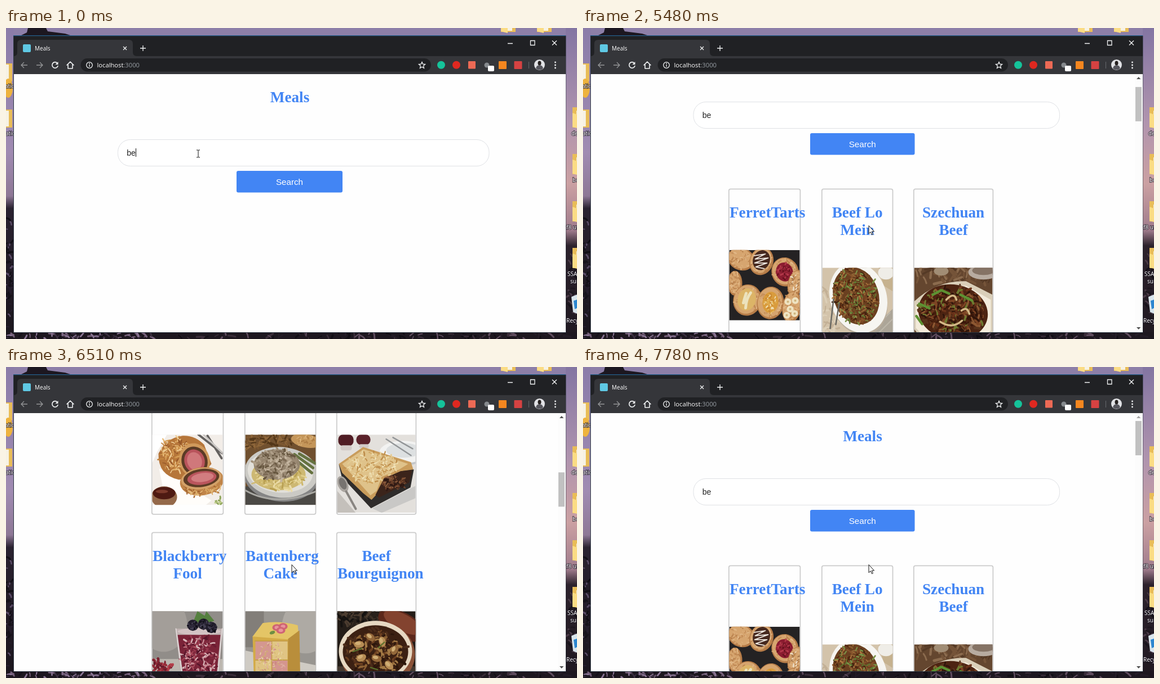
Recreate the animation shown at these times as an HTML page. Size 1013 by 553 pixels, loop 8000 ms.

```html
<!DOCTYPE html>
<html lang="en">
<head>
<meta charset="utf-8">
<title>Meals</title>
<style>
  html, body { margin: 0; width: 100%; height: 100%; overflow: hidden; background: #202124; }
  svg { display: block; }
  #stage { width: 1013px; height: 553px; }
  .ui { font: 10px "Open Sans", "Noto Sans", sans-serif; fill: #fff; }
  .label { paint-order: stroke; stroke: #1a1420; stroke-width: 2px; stroke-opacity: .7; }
  .head { font: bold 27.2px "Liberation Serif", serif; fill: #4285f4; }
  .field { font: 14px "Liberation Sans", sans-serif; fill: #222; }
  .btn { font: 15.2px "Liberation Sans", sans-serif; fill: #fff; }
  .line { fill: none; stroke: #f1f3f4; stroke-width: 1.3; }
</style>
</head>
<body>
<svg id="stage" viewBox="0 0 1013 553">
  <defs>
    <linearGradient id="dusk" x2="0" y2="1">
      <stop offset="0" stop-color="#8b7ca9"/><stop offset=".4" stop-color="#a08bb2"/>
      <stop offset=".54" stop-color="#8e7896"/><stop offset=".58" stop-color="#2a2230"/><stop offset="1" stop-color="#1a151c"/>
    </linearGradient>
    <linearGradient id="glow" x2="0" y2="1">
      <stop offset="0" stop-color="#8375a2"/><stop offset=".3" stop-color="#b094ae"/>
      <stop offset=".5" stop-color="#cba0a2"/><stop offset=".65" stop-color="#a07c8c"/>
      <stop offset=".7" stop-color="#2c222c"/><stop offset="1" stop-color="#1f1820"/>
    </linearGradient>
    <g id="folder">
      <path d="M0 2h11l3 4h12v32H0z" fill="#e9bd58"/><path d="M7 8h13v28H7z" fill="#f6f2e4"/>
      <path d="M0 12l12 4v24L0 37z" fill="#fbdc84"/>
    </g>
  </defs>
  <g id="desktop"></g>
  <g id="chrome"></g>
  <svg x="14" y="82" width="979" height="459" viewBox="14 82 979 459">
    <rect x="14" y="82" width="979" height="459" fill="#fefefe"/>
    <g id="before"></g>
    <g id="after">
      <g id="scroll"></g>
      <rect x="979.5" y="82" width="13.5" height="459" fill="#fcfcfc"/>
      <rect id="thumb" x="980" y="96" width="11" height="61" fill="#c1c1c1"/>
      <path id="up" d="M982 91l3.7-4 3.7 4z"/>
      <path d="M982 532l3.7 4 3.7-4z" fill="#505050"/>
    </g>
  </svg>
  <path id="arrow" d="M.5.5v14.2l3.2-3 2.3 5 2-1-2.2-4.7h4.3z" fill="#fff" stroke="#111"/>
</svg>
<script>
const $ = id => document.getElementById(id);
const rect = (x, y, w, h, fill, r = 0) => `<rect x="${x}" y="${y}" width="${w}" height="${h}" rx="${r}" fill="${fill}"/>`;
const oval = (x, y, rx, ry, fill, turn = 0) =>
  `<ellipse cx="${x}" cy="${y}" rx="${rx}" ry="${ry}" fill="${fill}" transform="rotate(${turn} ${x} ${y})"/>`;
const shape = (d, fill) => `<path d="${d}" fill="${fill}"/>`;
const line = (d, color, w) => `<path d="${d}" fill="none" stroke="${color}" stroke-width="${w}" stroke-linecap="round" stroke-linejoin="round"/>`;
const icon = d => `<path class="line" d="${d}"/>`;
const text = (cls, x, y, s, anchor = 'start') => `<text class="${cls}" x="${x}" y="${y}" text-anchor="${anchor}">${s}</text>`;

// Seeded short strokes inside a tilted ellipse, finer ones last
function bits(seed, n, cx, cy, rx, ry, colors, len = 6, w = 3, turn = 0) {
  const rnd = () => (seed = seed * 16807 % 2147483647) / 2147483647;
  rnd();
  let out = '';
  for (let i = 0; i < n; i++) {
    const a = rnd() * 6.283, r = Math.sqrt(rnd()), b = rnd() * 6.283, size = 1.2 - .7 * i / n;
    const x = cx + Math.cos(a) * r * rx, y = cy + Math.sin(a) * r * ry;
    const dx = Math.cos(b) * len * size, dy = Math.sin(b) * len * size;
    out += line(`M${x.toFixed(1)} ${y.toFixed(1)}q${(dx / 2 + 1).toFixed(1)} ${(dy / 2 - 1).toFixed(1)} ${dx.toFixed(1)} ${dy.toFixed(1)}`, colors[i % colors.length], (w * size).toFixed(1));
  }
  return `<g transform="rotate(${turn} ${cx} ${cy})">${out}</g>`;
}

// Baked dough: dark rim, light top, fine crumbs
const dough = (seed, x, y, rx, ry, turn) => oval(x, y, rx, ry, '#b67c48', turn) + oval(x - 1, y - 1, rx - 2.5, ry - 2.5, '#d6a56f', turn)
  + bits(seed, 45, x, y, rx - 3, ry - 3, ['#c48d58', '#e2b989', '#b9814d', '#dcae7a'], 4, 2, turn);

const photos = {
  pastries: () => rect(0, 0, 125, 125, '#242223')
    + dough(11, 21, 16, 24, 20, 20) + dough(12, 57, 20, 21, 25, 20) + oval(57, 18, 15, 18, '#46291f', 20)
    + line('M44 10l20-3-18 9 23-2-24 9 22 0-20 7 15 3', '#eee7df', 1.8)
    + dough(13, 99, 39, 24, 26, -20) + oval(98, 39, 15, 17, '#8b1c30', -20) + bits(5, 40, 97, 39, 12, 14, ['#b5394b', '#65101d', '#952537'], 4, 2.5)
    + dough(14, 10, 59, 13, 22, 0) + dough(15, 118, 59, 14, 24, 15) + bits(18, 14, 118, 58, 8, 14, ['#eee0c9', '#a3764c'], 4, 2)
    + dough(16, 32, 89, 25, 28, 15) + oval(31, 88, 16, 20, '#dcb467', 15) + line('M38 76q-8 10-9 27M30 77q-3 9-5 17', '#ece3bd', 5)
    + dough(17, 73, 94, 24, 29, 8) + oval(73, 93, 14, 19, '#d99c3d', 8) + bits(3, 50, 73, 94, 12, 17, ['#f1e0b5', '#c57f2c', '#e6b95c'], 3, 1.8)
    + dough(18, 111, 101, 17, 28, 10) + [[104, 92], [117, 90], [108, 105], [116, 113], [102, 116]].map(p => oval(...p, 6, 6, '#efe3c2') + oval(...p, 2, 2, '#cfb57d')).join(''),

  noodles: () => rect(0, 0, 125, 125, '#d3c3aa') + bits(24, 40, 12, 80, 16, 50, ['#dccfb8', '#c3b096'], 14, 3)
    + shape('M72 125l53-52v52z', '#aca598') + line('M80 120l40-40M92 124l32-32', '#bdb7aa', 2) + shape('M100 0h25v42l-16-10z', '#c6b28f')
    + oval(113, 9, 14, 12, '#efede7') + oval(65, 57, 49, 64, '#b7ab9a', -18) + oval(64, 53, 50, 64, '#f6f5f1', -18)
    + oval(60, 50, 40, 52, '#6a4020', -18)
    + bits(21, 330, 60, 50, 37, 49, ['#54270f', '#85522a', '#5f7a32', '#ac783f', '#3f200f', '#764322', '#8d6133', '#7a9248'], 7, 2.6, -18)
    + line('M14 108l6-52M24 101l6-38', '#696862', 2.5),

  szechuan: () => rect(0, 0, 139, 139, '#64462f') + bits(25, 50, 70, 12, 70, 14, ['#8b6b4e', '#755439', '#553a26'], 16, 4)
    + oval(123, 8, 27, 13, '#b7aba0') + oval(123, 5, 20, 8, '#857365') + oval(48, 6, 13, 8, '#a18d75')
    + shape('M0 60Q40 22 92 24l47 24v71l-32 20H23L0 109z', '#dacfb9') + shape('M3 66Q44 30 92 32l44 25v55l-31 24H30L3 107z', '#f3ebdb')
    + oval(69, 79, 62, 49, '#4d2412', 10)
    + bits(31, 300, 68, 78, 56, 43, ['#3a170a', '#693219', '#7d4524', '#4a210f', '#58331c', '#2f150b', '#8d5731', '#6e7a30'], 9, 4)
    + line('M9 64l18 8M33 48l15-8 14 6M82 48l20 10M4 86l10 14', '#5d9132', 4.500)
    + line('M57 57q14-15 18 0M46 96q22 14 39-2M84 76q10-8 14 6', '#d4b887', 3.500),

  wellington: () => rect(0, 0, 125, 125, '#f2ede8') + shape('M0 0h26L9 30 0 50z', '#fff')
    + line('M98 2l25 40M82 0l42 33', '#64615f', 4) + line('M91 0l34 33', '#c9c6c3', 3)
    + shape('M12 60l93 57-10 8H25z', '#fffdfa')
    + shape('M11 34Q24 6 54 2q22-1 38 16l13 34-22 26-36 2Q10 72 11 34z', '#b6763a')
    + bits(9, 130, 42, 36, 29, 29, ['#d79f58', '#e9bd7c', '#98592a', '#c4853f', '#f0cf98'], 8, 2.2)
    + oval(75, 46, 27, 31, '#d09a5c', -18) + oval(75, 47, 23, 26, '#5b3b26', -18) + oval(75, 47, 18, 21, '#b9545c', -18) + oval(75, 47, 13, 16, '#d0787b', -18)
    + oval(88, 83, 39, 25, '#c08448', -8) + bits(10, 60, 90, 96, 33, 13, ['#d9a864', '#a3642f', '#e6be80'], 7, 2)
    + oval(87, 78, 36, 19, '#d3a168', -8) + oval(87, 77, 32, 16, '#5d3c26', -8) + oval(88, 77, 26, 12, '#ba555d', -8) + oval(89, 76, 20, 8, '#d27d80', -8)
    + oval(21, 111, 23, 19, '#94694a') + oval(21, 104, 20, 11, '#4e1a12') + oval(17, 101, 11, 3, '#7c3a2b')
    + bits(6, 14, 119, 119, 8, 6, ['#8ca457', '#bdcb89'], 4, 2.5),

  stroganoff: () => rect(0, 0, 125, 125, '#70502f') + bits(23, 60, 45, 12, 48, 14, ['#8f673a', '#533719', '#7d5831'], 12, 3)
    + oval(108, 11, 27, 12, '#c4965a', 10) + bits(26, 20, 108, 11, 20, 8, ['#dbb37a', '#ab7a42'], 5, 2) + rect(0, 92, 125, 33, '#4b4945')
    + oval(64, 72, 67, 47, '#858585', 5) + oval(64, 67, 65, 45, '#cbcac5', 5) + oval(62, 66, 58, 37, '#e2e0da', 5)
    + line('M87 35l33 24M96 34l28 17M87 43l31 25', '#657240', 5)
    + oval(59, 71, 48, 28, '#cdb873')
    + bits(44, 120, 58, 76, 43, 23, ['#e2d08e', '#b9a052', '#ebdcaa', '#cfb96f'], 9, 3)
    + oval(56, 53, 41, 27, '#95856f')
    + bits(13, 190, 55, 53, 38, 25, ['#b0a08a', '#7c6a55', '#c4b5a0', '#9b8a74', '#66563f'], 6, 3.500)
    + line('M0 99q54 31 125 2', '#aaa9a4', 3),

  pie: () => rect(0, 0, 139, 139, '#e3e0dc') + shape('M0 100l33 39H0z', '#c4c0bb') + shape('M62 131l77-40v22l-60 26z', '#c9c8c6')
    + rect(2, 0, 27, 20, '#501c24', 8) + rect(34, 0, 25, 18, '#5b222a', 8) + rect(6, 19, 20, 9, '#d2cac7', 4) + rect(39, 17, 17, 7, '#d2cac7', 3)
    + oval(116, 35, 43, 20, '#c3c6c9') + oval(117, 31, 42, 20, '#f2f2f1') + oval(118, 28, 31, 13, '#dde0e1')
    + line('M87 8l44 29M99 5l35 20', '#939698', 2.5)
    + shape('M3 53l5 22 52 56 70-37 6-32z', '#2f2c2b')
    + shape('M3 52L46 22l85 27 4 13-22 3-30 13-9 24-13 14-15-12L9 68z', '#c99c5b') + shape('M9 52l38-26 79 26-16 10-31 13-9 25-11 8z', '#dfc28a')
    + bits(19, 170, 61, 58, 45, 27, ['#ead7a4', '#cda15c', '#e4cb92', '#bd8c4a', '#f0e2b8'], 6, 2.2)
    + shape('M83 78l30-13 20-2-5 22-54 27-6-5z', '#3b241b') + bits(7, 70, 101, 86, 22, 11, ['#6d4029', '#2f1812', '#8a5b3c'], 5, 2.5)
    + oval(10, 88, 9, 15, '#aaa5a0', -23) + oval(10, 87, 6, 11, '#777370', -23) + line('M16 101l17 31', '#898581', 4),

  fool: () => rect(0, 0, 125, 141, '#918d89') + oval(20, 24, 42, 48, '#a39e99') + rect(0, 85, 125, 56, '#bcb7b0')
    + bits(4, 60, 14, 98, 20, 11, ['#651929', '#b5404b', '#7c2330', '#952c38'], 4, 4)
    + shape('M41 31h84l-9 110H54z', '#bfb2b1') + shape('M45 42h76l-9 94H58z', '#7a2338')
    + bits(27, 190, 84, 84, 29, 40, ['#97374c', '#c78b94', '#56152a', '#a94c5c', '#6b1c31', '#802a3e', '#d9b7ba'], 9, 3)
    + line('M42 31l14 105M124 31l-10 104', '#e6dede', 1.5) + oval(83, 36, 38, 6, '#d3c3c4')
    + shape('M73 18l7-18 13 8 3-8 14 17-18 6z', '#55803f')
    + [[72, 25], [91, 23], [105, 29]].map(([x, y], i) => oval(x, y, 10, 10, '#211d2b') + bits(i + 2, 22, x, y, 8, 8, ['#444053', '#100e18', '#2f2a3b'], 2, 3)).join(''),

  battenberg: () => rect(0, 0, 125, 141, '#989590') + oval(107, 27, 42, 48, '#aeaaa4') + shape('M0 70L125 96v45H0z', '#cfcbc4')
    + rect(0, 0, 33, 64, '#827e79') + shape('M13 45l20-22 60 2 4 116H16z', '#d3ab47') + shape('M13 45l18-24q31-5 62 4l2 19-20 6z', '#e4c566')
    + shape('M76 49l20-15 2 107H75z', '#b98e3b') + rect(18, 53, 29, 33, '#d49790') + rect(47, 53, 28, 33, '#e0c584')
    + rect(18, 87, 29, 40, '#dfc483') + rect(47, 87, 28, 40, '#d4958e') + line('M17 53h59M18 87h57M47 54v74', '#c19a47', 1.5)
    + bits(15, 120, 46, 89, 25, 34, ['#ead8a6', '#c98681', '#d0b06c', '#e0b0a3'], 3, 1.5)
    + [[56, 29], [67, 27], [63, 34]].map(p => oval(...p, 8, 6, '#cf6474') + oval(...p, 4, 3, '#e8959c')).join('') + oval(48, 38, 5, 3, '#6f8f42', -20),

  stew: () => rect(0, 0, 139, 141, '#241d18') + bits(10, 60, 49, 12, 48, 14, ['#3d3228', '#151210', '#4d3d30', '#2a221c'], 12, 4)
    + oval(114, 25, 45, 23, '#5c281b', 28) + oval(116, 20, 37, 15, '#83432f', 28)
    + rect(0, 98, 139, 43, '#453930') + oval(72, 77, 66, 58, '#8a5238') + oval(68, 71, 65, 54, '#e6d8c2') + oval(68, 72, 58, 47, '#3c2012')
    + bits(61, 210, 68, 73, 52, 41, ['#6b3f20', '#2c160b', '#8c6134', '#4c2c1a', '#3a2114', '#a37a45'], 7, 4)
    + [[39, 59], [59, 46], [80, 54], [102, 69], [43, 83], [70, 84], [92, 96]].map(([x, y], i) =>
        oval(x, y, 9, 6, i % 2 ? '#94683a' : '#b68c54', i * 38) + oval(x - 2, y - 2, 5, 3, '#d0ad74', i * 38)).join('')
    + line('M28 72l16-6M73 65l11-10M59 100l13 4', '#58732d', 2)
};

const columns = [[258.8, 126.6, 125], [423.8, 125.7, 125], [586.8, 140.6, 139]];
const meals = [
  ['FerretTarts', 'pastries'], ['Beef Lo|Mein', 'noodles'], ['Szechuan|Beef', 'szechuan'],
  ['Beef|Wellington', 'wellington'], ['Beef|stroganoff', 'stroganoff'], ['Minced|Beef Pie', 'pie'],
  ['Blackberry|Fool', 'fool'], ['Battenberg|Cake', 'battenberg'], ['Beef|Bourguignon', 'stew']
];

function card([title, photo], i) {
  const [x, w, size] = columns[i % 3], y = 353.3 + 314 * Math.floor(i / 3);
  const lines = title.split('|');
  const tall = i > 5 ? 141 : size;
  return `<rect x="${x}" y="${y}" width="${w}" height="281.5" rx="3" fill="none" stroke="#ccc" stroke-width="1.8"/>`
    + `<svg class="photo" x="${x + .7}" y="${y + 77 + 31.5 * lines.length}" width="${size}" height="${tall}" viewBox="0 0 ${size} ${tall}">${photos[photo]()}</svg>`
    + lines.map((s, k) => `<text class="head fit" data-min="${x + 1.2}" data-mid="${x + w / 2}" y="${y + 50.4 + 31.5 * k}">${s}</text>`).join('');
}

const form = (mid, x, w, bx, bw, extra = '') => text('head', mid, 132, 'Meals', 'middle')
  + `<rect x="${x}" y="198.5" width="${w}" height="47" rx="22" fill="#fff" stroke="#dfe1e5"/>`
  + `<text class="field" x="${x + 15.8}" y="226.5">be</text>${extra}`
  + rect(bx, 254, bw, 38.6, '#4285f4', 3) + text('btn', bx + bw / 2, 278.5, 'Search', 'middle');

function buildDesktop() {
  let s = rect(0, 0, 1013, 553, '#8d7fa8') + rect(0, 0, 14, 553, 'url(#dusk)') + rect(993, 0, 20, 553, 'url(#glow)')
    + shape('M25 14l12-6 2-8h32l3 6 31 4 12 4z', '#1c1720') + rect(0, 541, 1013, 12, '#1d171f')
    + bits(77, 70, 130, 548, 130, 5, ['#15111a', '#745f78', '#3a2e3f', '#8a7594'], 9, 3)
    + bits(78, 90, 630, 548, 370, 5, ['#110e14', '#3a2d39', '#241c27', '#5f4c5e'], 12, 3)
    + bits(12, 40, 5, 430, 5, 105, ['#15111a', '#5c4d69', '#251d2d', '#120f16'], 7, 3)
    + bits(14, 24, 1005, 470, 8, 70, ['#15111a', '#4a3a47', '#1d171f'], 8, 3);
  const folder = (x, y) => `<use href="#folder" x="${x}" y="${y}"/>`;
  s += folder(878, -31) + folder(942, -31) + folder(-15, 57) + oval(4, 107, 8, 17, '#eeb33e') + folder(-15, 139);
  for (const y of [139, 222, 306, 389]) s += folder(1005, y);
  s += shape('M1003 478l10-4v34l-7-3z', '#d9e5ec') + shape('M1007 485l6-2v15l-4 2z', '#2c86d0');
  for (const [x, y, t] of [[-2, 107, 'atic'], [-1, 191, 'atic'], [1003, 191, 'de'], [1005, 274, 'bo'], [994, 358, 'f8 us'], [996, 441, 'SSA'], [1001, 454, 'sur'], [994, 524, 'Recy']])
    s += text('ui label', x, y, t);
  return s;
}

function buildChrome() {
  return rect(13, 13.5, 980.5, 528.5, '#2a3540') + rect(13, 13, 980, 1.2, '#23608f')
    + rect(14, 14.5, 979, 36, '#202124') + rect(14, 50, 979, 32, '#35363a')
    + shape('M14 50q6 0 6-7V28q0-7 7-7h191q7 0 7 7v15q0 7 7 7z', '#35363a')
    + rect(30, 29, 14, 14, '#5fc9e4', 2) + text('ui', 51, 39.5, 'Meals')
    + icon('M208 33l6 6m0-6l-6 6M238 36h10m-5-5v10M890 27.5h9M930.5 22.5h7.5v8h-7.5zM969 22.5l8 8m0-8l-8 8')
    + `<g opacity=".5">${icon('M38 66H27m5-5l-5 5 5 5M54 66h11m-5-5l5 5-5 5')}</g>`
    + line('M91 62.5a5.2 5.2 0 1 0 1 5', '#f1f3f4', 1.7) + shape('M92.5 60v5h-5z', '#f1f3f4')
    + line('M108 66l6-6 6 6m-10-1v7h8v-7', '#f1f3f4', 1.6)
    + rect(132.5, 54, 621.5, 23.5, '#202124', 11.7)
    + '<circle class="line" cx="148" cy="66" r="5.3"/>' + line('M148 65.5v3', '#f1f3f4', 1.3) + oval(148, 63, .9, .9, '#f1f3f4')
    + '<text class="ui" style="font-size:11.2px" x="161.5" y="70">localhost<tspan fill="#9aa0a6">:3000</tspan></text>'
    + icon('M738 60.5l1.6 3.7 4 .4-3 2.7.9 4-3.5-2.1-3.5 2.1.9-4-3-2.7 4-.4z')
    + oval(772, 65.7, 7, 7, '#15c39a') + oval(799, 65.7, 7, 7, '#df2820') + rect(820, 59, 13, 13.5, '#ed6a55', 1)
    + oval(853, 66, 4.5, 4.5, '#85898d') + rect(855, 67, 11, 10, '#fff', 2)
    + rect(874, 59, 14, 14, '#f5861f', 1) + rect(901.5, 59, 14, 14, '#d64242', 1) + rect(927, 60, 1, 12, '#66696d')
    + oval(946.5, 65.5, 9.5, 9.5, '#e2e3e6') + oval(946.5, 62.5, 3, 4, '#24201f') + shape('M940 72q1-6 6.5-6t6.5 6q-6 5-13 0z', '#56565d')
    + [61, 66, 71].map(y => oval(974.5, y, 1.4, 1.4, '#f1f3f4')).join('');
}

$('desktop').innerHTML = buildDesktop();
$('chrome').innerHTML = buildChrome();
$('before').innerHTML = form(503.5, 198.5, 658.5, 409, 188,
  rect(230, 214, 1, 15, '#111').replace('<rect', '<rect id="caret"')
  + '<path id="beam" d="M-3-6.5h2.5l.5.5.5-.5H3M0-6V6M-3 6.5h2.5L0 6l.5.5H3" fill="none" stroke="#111"/>');
$('scroll').innerHTML = form(496, 196, 649.5, 403, 185.5) + meals.map(card).join('');

// Long words overflow to the right instead of being centred
for (const el of document.querySelectorAll('.fit'))
  el.setAttribute('x', Math.max(el.dataset.min, el.dataset.mid - el.getComputedTextLength() / 2));

const typing = [[0, 'be', 1], [120, 'bee', 1], [680, 'bee', 0], [930, 'be', 1], [1240, 'be', 0], [1770, 'be', 1], [2210, 'be', 0], [2800, 'be', 1], [3240, 'be', 0]];
const mouse = [[0, 341, 223.5], [2210, 415.5, 255.5], [2360, 430, 278], [2510, 470, 296], [2650, 511, 308], [2800, 505, 303], [2950, 488, 295], [3090, 470, 288], [3240, 456, 282], [4930, 482, 320], [5050, 506.5, 351]];
const scrolls = [[0, 0], [5480, 67], [5600, 155], [5730, 244], [5860, 330], [6000, 408], [6120, 492], [6260, 590], [6390, 660], [6510, 687],
  [6790, 595], [6950, 465], [7100, 333.5], [7220, 250], [7370, 155], [7500, 85], [7640, 28], [7780, 0]];
const RESULTS = 3800, PICTURES = 3950, LOOP = 8000;

const at = (table, t) => table.findLast(row => row[0] <= t);
const show = (el, on) => el.setAttribute('visibility', on ? 'visible' : 'hidden');
const field = document.querySelector('#before .field');
const pictures = [...document.querySelectorAll('.photo')];

function draw(t) {
  const [, value, blink] = at(typing, t);
  const [, x, y] = at(mouse, t);
  const [, top] = at(scrolls, t);
  const done = t >= RESULTS, beam = t < 2360;

  field.textContent = value;
  $('caret').setAttribute('x', value.length > 2 ? 237 : 230);
  $('caret').setAttribute('opacity', blink);
  $('before').style.display = done ? 'none' : '';
  $('after').style.display = done ? '' : 'none';
  for (const p of pictures) p.style.display = t >= PICTURES ? '' : 'none';

  $('scroll').setAttribute('transform', `translate(0 ${-top})`);
  $('thumb').setAttribute('y', 96 + top * .133);
  $('up').setAttribute('fill', top ? '#505050' : '#a3a3a3');

  show($('beam'), beam);
  show($('arrow'), !beam);
  $(beam ? 'beam' : 'arrow').setAttribute('transform', `translate(${x} ${y})`);
}

const start = performance.now();
function tick() {
  draw((performance.now() - start) % LOOP);
  requestAnimationFrame(tick);
}
tick();
</script>
</body>
</html>
```
